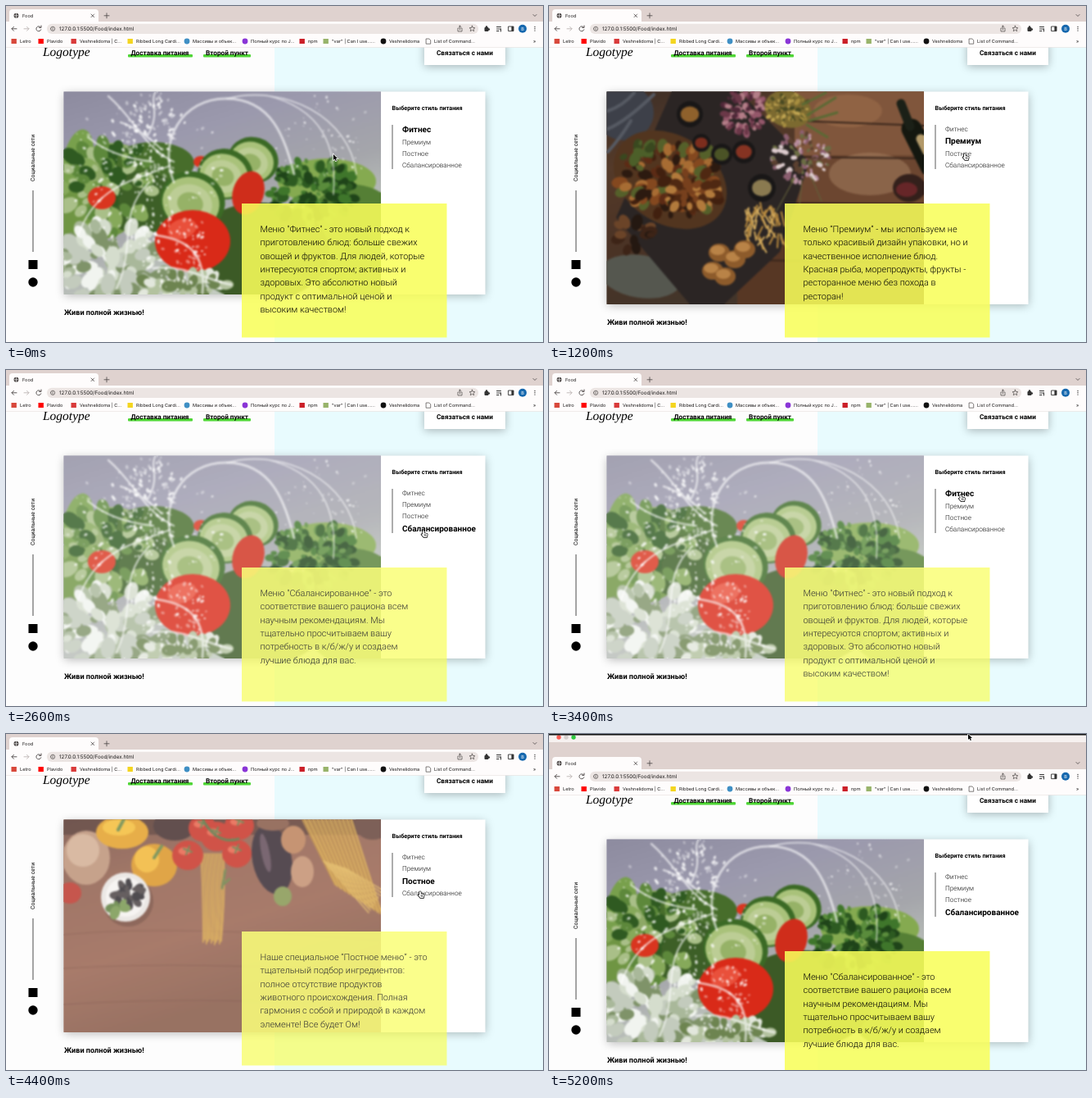
These frames come from a looping animation (656 by 410 pixels, 5.3 s). An HTML page with a canvas:

```html
<!DOCTYPE html>
<html lang="ru">
<head>
<meta charset="utf-8">
<title>Food</title>
<style>
html, body { margin: 0; width: 100%; height: 100%; overflow: hidden; background: #fff; }
canvas { display: block; }
</style>
</head>
<body>
<canvas id="stage" width="656" height="410"></canvas>
<script>
const LOOP = 5300, STEP = 100, FADE = 400;
const stage = document.getElementById('stage').getContext('2d');
let g = stage;

// Drawing helpers, all acting on the current context g
function newLayer() {
  const canvas = document.createElement('canvas');
  canvas.width = 656;
  canvas.height = 410;
  g = canvas.getContext('2d');
  return canvas;
}
function text(s, x, y, size, weight = 400, color = '#000', family = 'Roboto, sans-serif') {
  g.textRendering = 'geometricPrecision';
  g.font = `${weight} ${size}px ${family}`;
  g.fillStyle = color;
  g.fillText(s, x, y);
}
const ui = (s, x, y, size = 5.6) => text(s, x, y, size, 400, '#1c1a1a', 'Inter, sans-serif');
function rect(color, x, y, w, h, radius = 0) {
  g.fillStyle = color;
  g.beginPath();
  g.roundRect(x, y, w, h, radius);
  g.fill();
}
function oval(color, x, y, rx, ry = rx, turn = 0) {
  g.fillStyle = color;
  g.beginPath();
  g.ellipse(x, y, rx, ry, turn, 0, 7);
  g.fill();
}
function line(color, width, d) {
  g.strokeStyle = color;
  g.lineWidth = width;
  g.lineCap = 'round';
  g.stroke(new Path2D(d));
}
function shape(color, d) {
  g.fillStyle = color;
  g.fill(new Path2D(d));
}
function backdrop(...colors) {
  const fill = g.createLinearGradient(70, 104, 150, 364);
  colors.forEach((c, i) => fill.addColorStop(i / (colors.length - 1), c));
  rect(fill, 70, 104, 388, 260);
}
function shadowed(x, y, w, h) {
  g.save();
  g.shadowColor = 'rgba(0,0,0,.28)';
  g.shadowBlur = 11;
  g.shadowOffsetY = 2;
  rect('#fff', x, y, w, h);
  g.restore();
}
function random(seed) {
  return () => (seed = seed * 16807 % 2147483647) / 2147483647;
}
// Scatters small ovals over an elliptic patch
function scatter(colors, count, x, y, rx, ry, size, seed) {
  const rnd = random(seed);
  for (let i = 0; i < count; i++) {
    const a = rnd() * 6.28, r = Math.sqrt(rnd()), s = size * (.5 + rnd());
    oval(colors[i % colors.length], x + rx * r * Math.cos(a), y + ry * r * Math.sin(a), s, s * .7, a);
  }
}

function saladPhoto() {
  backdrop('#8d8b9f', '#9b99ad', '#a5a6ab', '#c3cbc0');
  oval('#78a04c', 88, 188, 18, 38, .2);
  oval('#8da866', 130, 195, 42, 28);
  oval('#476d2b', 180, 192, 50, 26);
  oval('#6f9543', 110, 250, 58, 36, -.2);
  oval('#3d5f27', 165, 240, 50, 38);
  oval('#85aa50', 392, 214, 60, 28);
  oval('#557f35', 425, 290, 66, 72);
  oval('#3c5a26', 310, 300, 85, 60);
  scatter(['#5d883b', '#2f5a21', '#86a95a', '#a9bf88'], 70, 125, 220, 60, 58, 9, 77);
  scatter(['#2d5a21', '#3f762b', '#1f4419', '#5a8c3c'], 150, 376, 226, 54, 40, 6, 31);
  scatter(['#d5ddcd', '#f1f4ef', '#a9b89a', '#7f9369', '#c3cbbd'], 160, 130, 314, 66, 50, 9, 57);
  oval('#d9351f', 117, 234, 17, 14);
  oval('#d9351f', 238, 190, 9, 7);
  for (const [x, y, r] of [[302, 188, 31], [268, 205, 34], [228, 238, 40]]) {
    oval('#3b6a25', x, y, r, r * .9, .3);
    oval('#a9c27a', x - 2, y + 2, r * .88, r * .78, .3);
    oval('#bccd95', x - 3, y + 3, r * .68, r * .58, .3);
    oval('#96b267', x - 3, y + 3, r * .4, r * .34, .3);
  }
  oval('#cf2d1b', 296, 228, 19, 27, .3);
  oval('#d92a18', 228, 287, 46, 38);
  oval('#e9503b', 215, 272, 18, 12, -.3);
  scatter(['#e2e7dc', '#b3c29f', '#6d8450'], 45, 220, 342, 62, 16, 7, 12);
  const foam = 'rgba(255,255,255,.6)';
  line(foam, 3, 'M205 215C185 165 215 112 270 113S340 160 352 205');
  line(foam, 1.6, 'M270 113C340 95 420 135 428 205M318 109C385 125 405 170 400 230');
  line(foam, 2.4, 'M205 190C165 170 160 140 125 110M172 160C190 130 175 118 182 106M190 175Q165 150 140 142');
  line(foam, 2.4, 'M200 195C150 215 110 220 88 280M175 215C135 255 160 290 135 345M180 190Q130 185 100 160');
  line(foam, 3, 'M185 280C220 285 245 300 240 350M180 320C220 315 245 335 275 340');
  const drops = ['rgba(255,255,255,.75)', 'rgba(255,255,255,.4)'];
  scatter(drops, 170, 170, 200, 95, 95, 1.8, 91);
  scatter(drops, 120, 178, 165, 32, 62, 2, 23);
  scatter(drops, 80, 205, 300, 42, 45, 2, 41);
  scatter(drops, 50, 390, 165, 62, 58, 1.4, 17);
}

function grillPhoto() {
  backdrop('#3c2e27', '#543a29', '#4b3325', '#43352a');
  rect('#80563c', 300, 104, 158, 78);
  rect('#6c4630', 285, 182, 173, 58);
  rect('#573724', 230, 240, 228, 124);
  oval('rgba(168,130,98,.5)', 392, 205, 50, 26);
  oval('rgba(160,112,76,.5)', 365, 128, 42, 20);
  line('#38251b', 2, 'M300 140L458 146M290 184L458 186M275 240L458 242M250 310L458 314');
  oval('#55574f', 112, 330, 50, 26, .15);
  oval('#3d4049', 92, 130, 36, 34);
  line('#565a63', 4, 'M72 150Q95 140 128 108M72 178Q88 160 100 140M72 128Q90 122 104 106');
  shape('#2b2524', 'M150 104H232L318 190L282 300L214 364H172L82 258Z');
  oval('#52351f', 148, 212, 74, 54, .55);
  scatter(['#84481f', '#5c2b15', '#a76c33', '#41200f', '#55602a', '#2c1a10'], 130, 148, 212, 66, 46, 7, 43);
  scatter(['#b27a3c', '#77401d', '#4f2812'], 40, 172, 224, 34, 26, 6, 29);
  scatter(['#4c5f29', '#39481f'], 14, 108, 178, 20, 14, 6, 19);
  for (const [x, y, r, c] of [[172, 132, 16, '#8f612c'], [186, 167, 11, '#7c2d1d'], [211, 181, 13, '#4b5326'],
                              [238, 178, 14, '#853322'], [260, 222, 17, '#8a7a50']]) {
    oval('#191717', x, y, r);
    oval(c, x, y, r * .7, r * .6);
  }
  scatter(['#6b3848', '#94576a', '#4f2838', '#b37d87'], 85, 238, 128, 26, 28, 4, 72);
  oval('#7c6a30', 292, 126, 29, 22, .3);
  scatter(['#a88e40', '#4a4a22', '#c0a552'], 70, 292, 126, 27, 20, 2.6, 8);
  line('#5a6a34', 3, 'M316 133L350 112M318 140L352 130M315 145L340 160M310 120L338 106');
  scatter(['#b98fa0', '#dccbcd', '#6b6c43', '#8c5f70', '#5b4030'], 110, 308, 185, 35, 31, 3, 65);
  line('#625f3a', 1.2, 'M300 210L278 250M309 212L306 244M320 208L333 238');
  const rnd = random(37);
  for (let i = 0; i < 45; i++) {
    const x = 240 + rnd() * 44, y = 240 + rnd() * 44;
    line(i % 2 ? '#b98a3e' : '#d3ab5e', 2, `M${x} ${y}l${rnd() * 20 - 10} ${8 + rnd() * 10}`);
  }
  for (const [x, y] of [[208, 301], [227, 309], [200, 323], [215, 330], [239, 297]]) {
    oval('#8d5b2b', x, y, 13, 11);
    oval('#b98347', x - 2, y - 3, 9, 6);
  }
  scatter(['#3d2417', '#6b4428', '#241811'], 16, 103, 279, 24, 20, 7, 26);
  line('#14170f', 25, 'M443 150L466 196');
  line('#1b2017', 11, 'M430 119L441 147');
  line('#b39a6a', 11, 'M454 162L462 178');
  oval('#33201b', 440, 222, 20, 17);
  oval('#662628', 437, 224, 13, 9);
}

function pastaPhoto() {
  backdrop('#704638', '#8b5744', '#935b47', '#80503d');
  line('rgba(85,42,32,.35)', 1, 'M70 245Q200 232 458 252M70 286Q230 276 458 292M70 330Q260 318 458 335');
  rect('rgba(57,31,25,.6)', 70, 104, 388, 19);
  oval('#b98c70', 98, 151, 29, 33);
  oval('#d0aa8d', 94, 142, 20, 20);
  oval('#b92d22', 78, 194, 14, 13);
  oval('#3c2524', 206, 112, 26, 18);
  oval('#e29b1d', 142, 120, 32, 20);
  oval('#f3b92e', 138, 114, 20, 10);
  oval('#d9901b', 181, 160, 28, 26);
  oval('#f1b32c', 172, 153, 15, 16);
  line('#62803a', 4, 'M144 104L137 117M190 137L181 151');
  for (let x = 238; x < 268; x += 2.5) {
    line(x % 5 ? '#d8a23d' : '#e7bd62', 1.6, `M${x} 146Q${x + 3} 190 ${252 + (x - 252) * .8} ${250 + x % 4 * 2}`);
  }
  for (const [x, y, r] of [[240, 115, 17], [285, 112, 18], [257, 125, 19], [222, 148, 19], [282, 146, 18]]) {
    oval('#c52a1c', x, y, r, r * .95);
    oval('#e65a40', x - 4, y - 5, r * .4, r * .25);
    line('#567439', 2, `M${x - 5} ${y - 8}l10 4m-7 3l4 -10`);
  }
  line('#4f6a35', 3, 'M240 104Q258 136 284 128');
  oval('#2e2029', 325, 153, 24, 43, -.2);
  oval('#5a4350', 317, 145, 5, 24, -.2);
  oval('#7f9148', 338, 198, 11, 12);
  oval('#b97b52', 351, 129, 15, 17);
  oval('#c08a68', 362, 168, 14, 19);
  oval('#80503d', 326, 109, 20, 9);
  for (let i = 0; i < 24; i++) {
    line(i % 2 ? '#d9a43d' : '#b98130', 1.8, `M${362 + i * 2.6} 104L${402 + i * 2.5} ${184 + i * 1.6}`);
  }
  for (let i = 0; i < 10; i++) line('#e0b252', 1.3, `M${388 + i * 3} ${155 + i}L${443 + i * 2} ${218 - i * 3}`);
  oval('#5e3a30', 448, 111, 22, 18);
  oval('rgba(60,30,22,.35)', 149, 204, 31);
  oval('#e7e3df', 146, 199, 30);
  oval('#f5f2ef', 146, 199, 24);
  scatter(['#252126', '#41393a'], 34, 149, 195, 17, 14, 4.5, 73);
  scatter(['#577a36', '#719247'], 8, 136, 211, 10, 8, 6, 15);
  line('#66783b', 3, 'M268 166L264 188M273 177L265 184');
}

const menus = [
  { name: 'Фитнес', height: 248, photo: saladPhoto, about: `Меню "Фитнес" - это новый подход к
приготовлению блюд: больше свежих
овощей и фруктов. Для людей, которые
интересуются спортом; активных и
здоровых. Это абсолютно новый
продукт с оптимальной ценой и
высоким качеством!` },
  { name: 'Премиум', height: 260, photo: grillPhoto, about: `Меню “Премиум” - мы используем не
только красивый дизайн упаковки, но и
качественное исполнение блюд.
Красная рыба, морепродукты, фрукты -
ресторанное меню без похода в
ресторан!` },
  { name: 'Постное', height: 260, photo: pastaPhoto, about: `Наше специальное “Постное меню” - это
тщательный подбор ингредиентов:
полное отсутствие продуктов
животного происхождения. Полная
гармония с собой и природой в каждом
элементе! Все будет Ом!` },
  { name: 'Сбалансированное', height: 248, photo: saladPhoto, about: `Меню "Сбалансированное" - это
соответствие вашего рациона всем
научным рекомендациям. Мы
тщательно просчитываем вашу
потребность в к/б/ж/у и создаем
лучшие блюда для вас.` }
];

function renderMenu(menu) {
  const layer = newLayer();
  g.save();
  g.beginPath();
  g.rect(70.5, 104.5, 387.5, menu.height - .5);
  g.clip();
  menu.photo();
  // Soften the photo
  g.filter = 'blur(1.2px)';
  g.drawImage(layer, 0, 0);
  g.restore();
  rect('rgba(249,254,90,.87)', 288, 241, 250.5, 163.5);
  menu.about.split('\n').forEach((s, i) => text(s, 310.5, 275.8 + i * 16.4, 10.93, 300));
  return layer;
}

function renderPage() {
  const layer = newLayer();
  rect('#fdfdfd', 0, 50, 328, 360);
  rect('#e8fbfe', 328, 50, 328, 360);
  text('Logotype', 45, 61, 15.5, 'italic 400', '#000', '"Liberation Serif", serif');
  rect('#4fd636', 149, 59, 79, 3.5, 1);
  rect('#4fd636', 241, 59, 58, 3.5, 1);
  text('Доставка питания', 152.5, 60.3, 8.2, 700);
  text('Второй пункт', 244, 60.3, 8.2, 700);
  shadowed(511, 40, 99, 32);
  text('Связаться с нами', 526, 60.3, 8.2, 700);
  g.save();
  g.translate(35.2, 214);
  g.rotate(-Math.PI / 2);
  text('Социальные сети', 0, 0, 6.9);
  g.restore();
  rect('#222', 32.6, 225, .8, 75);
  rect('#000', 27.5, 310, 11, 11);
  oval('#000', 33, 337, 5.7);
  renderBrowser();
  return layer;
}

function renderBrowser() {
  const ink = '#4a4544';
  rect('#dfd2cf', 0, 0, 656, 20);
  rect('#fefcfc', 4, 4, 109, 20, 4);
  rect('#fefcfc', 0, 19, 656, 31.5);
  rect('#e4dcda', 0, 50, 656, .6);
  oval(ink, 12.5, 11.8, 3);
  line('#fff', .6, 'M10 11.8h5M12.5 9v5.6');
  ui('Food', 20, 13.8);
  line(ink, .8, 'M104 10l3.6 3.6m0-3.6l-3.6 3.6M120 11.8h6m-3-3v6M644 10.5l2 2l2-2');
  rect('#ece5e3', 50, 21.7, 527, 12.3, 6);
  line(ink, .9, 'M13 27.8h-6l2.5-2.5m-2.5 2.5l2.5 2.5M42.2 25.8a3 3 0 1 0 .6 3M43 24v2.4h-2.4');
  line('#bdb5b3', .9, 'M22 27.8h6l-2.5-2.5m2.5 2.5l-2.5 2.5');
  line(ink, .7, 'M54.5 27.8a2.6 2.6 0 1 0 5.2 0a2.6 2.6 0 1 0-5.2 0M57.1 27.5v1.6M57.1 26.2v.1');
  ui('127.0.0.1:5500/Food/index.html', 65, 30.1, 6.3);
  line(ink, .7, 'M553 27h-1v4h5v-4h-1M554.5 29v-5l-1.4 1.4m1.4-1.4l1.4 1.4');
  line(ink, .7, 'M569.5 24.2l1 2.3l2.4.2l-1.8 1.6l.6 2.4l-2.2-1.3l-2.2 1.3l.6-2.4l-1.8-1.6l2.4-.2z');
  rect('#333', 584.5, 26, 5, 5, 1);
  oval('#333', 587, 25.6, 1.3);
  oval('#333', 589.8, 28.5, 1.3);
  line('#333', 1, 'M599.5 25.5h5M599.5 28h5M599.5 30.5h2.5M604.5 28v3');
  line('#333', .9, 'M614 25h6v5.6h-6z');
  rect('#333', 617.4, 25, 2.6, 5.6);
  oval('#1668ae', 631, 27.8, 5);
  text('В', 629.3, 29.9, 5.6, 400, '#fff', 'Inter, sans-serif');
  for (const y of [25.5, 27.8, 30.1]) oval('#333', 646, y, .7);
  const bookmarks = [
    [17, 'Letro', '#d8483b'], [50, 'Plavido', '#f00'], [90, 'Veshnelidoma | C...', '#d93a3a'],
    [159, 'Ribbed Long Cardi...', '#f4d51f'], [228, 'Массивы и объек...', '#3f8fc4', 1],
    [299, 'Полный курс по J...', '#8a35d6', 1], [369, 'npm', '#cb1f28'],
    [398, '"var" | Can I use......', '#98b36a'], [468, 'Veshnelidoma', '#111', 1]
  ];
  for (const [x, label, color, round] of bookmarks) {
    if (round) oval(color, x - 7, 43, 3.4);
    else rect(color, x - 10.5, 40, 6.4, 6);
    ui(label, x, 45);
  }
  line(ink, .7, 'M513.5 40h3.4l1.8 1.8v4.4h-5.2z');
  ui('List of Command...', 523, 45);
  ui('»', 644, 45);
}

const tabLayers = menus.map(renderMenu);
const page = renderPage();
g = stage;

// [time, menu index]
const clicks = [[-1000, 0], [500, 1], [1400, 2], [2400, 3], [3200, 0], [3800, 1], [4200, 2], [4600, 3]];
// [time, x, y] of the pointer tip
const pointerPath = [
  [0, 400, 181], [400, 500, 164], [600, 500, 164], [1100, 507, 180], [1800, 507, 180],
  [2300, 509, 196], [2600, 509, 196], [3100, 502, 150], [3300, 502, 150], [3700, 504, 164],
  [3900, 504, 174], [4200, 504, 178], [4400, 505, 192], [4800, 505, 192], [5200, 512, 0], [5300, 512, 0]
];
const arrow = new Path2D('M0 0V7L1.6 5.6L2.7 8L3.9 7.5L2.9 5.1H5Z');
const hand = new Path2D('M0 .8Q1 -.6 1.8 .8V3L5 3.6Q6 4 5.8 5L5 8H1.2L-1.6 4.8Q-1.4 3.6 0 4.6Z');

const clamp = x => Math.min(1, Math.max(0, x));

function drawPointer(t) {
  const i = pointerPath.findIndex(k => k[0] > t);
  const [t0, x0, y0] = pointerPath[i - 1], [t1, x1, y1] = pointerPath[i];
  const p = (t - t0) / (t1 - t0), k = p * p * (3 - 2 * p);
  const x = x0 + (x1 - x0) * k, y = y0 + (y1 - y0) * k;
  const hovering = x > 482 && [150, 164, 180, 194].some(c => Math.abs(y - c) < 5.5);
  g.save();
  g.translate(x, y);
  g.lineWidth = 1.4;
  g.fillStyle = hovering ? '#fff' : '#000';
  g.strokeStyle = hovering ? '#000' : '#fff';
  g.stroke(hovering ? hand : arrow);
  g.fill(hovering ? hand : arrow);
  if (hovering) line('#000', .6, 'M2.2 4.4v2M3.8 4.6v2');
  g.restore();
}

function drawCard(t) {
  const [since, active] = clicks.findLast(c => c[0] <= t);
  const { height } = menus[active];
  shadowed(70.5, 104.5, 515, height - .5);
  text('Выберите стиль питания', 471.5, 127.3, 7.29, 700);
  rect('#333', 471.6, 145, .8, 54);
  menus.forEach(({ name }, i) => {
    const y = 152.7 + i * 14.2 + (i > active ? 1.7 : 0);
    if (i === active) text(name, 484, y + 1.5, 10, 700);
    else text(name, 484, y, 8.2, 300, '#111');
  });
  text('Живи полной жизнью!', 71, 104 + height + 24.6, 9.11, 700);
  g.globalAlpha = .1 + .9 * (1 - (1 - clamp((t - since) / FADE)) ** 2.2);
  g.drawImage(tabLayers[active], 0, 0);
  g.globalAlpha = 1;
}

function draw(t) {
  const drop = 24 * clamp((t - 5000) / 200);
  g.save();
  g.translate(0, drop);
  g.drawImage(page, 0, 0);
  drawCard(t);
  if (drop) {
    rect('#dfd2cf', 0, -24, 656, 24);
    rect('#f6f1f0', 0, -24, 656, 10);
    ['#fb5b53', '#d5cfcd', '#2fc840'].forEach((c, i) => oval(c, 12 + i * 9, -20, 2.7));
  }
  g.restore();
  if (drop) rect('#111', 0, 0, 656, 1.5);
  drawPointer(t);
}

function tick(now) {
  draw(Math.floor(now % LOOP / STEP) * STEP);
  requestAnimationFrame(tick);
}
draw(0);
requestAnimationFrame(tick);
</script>
</body>
</html>
```
